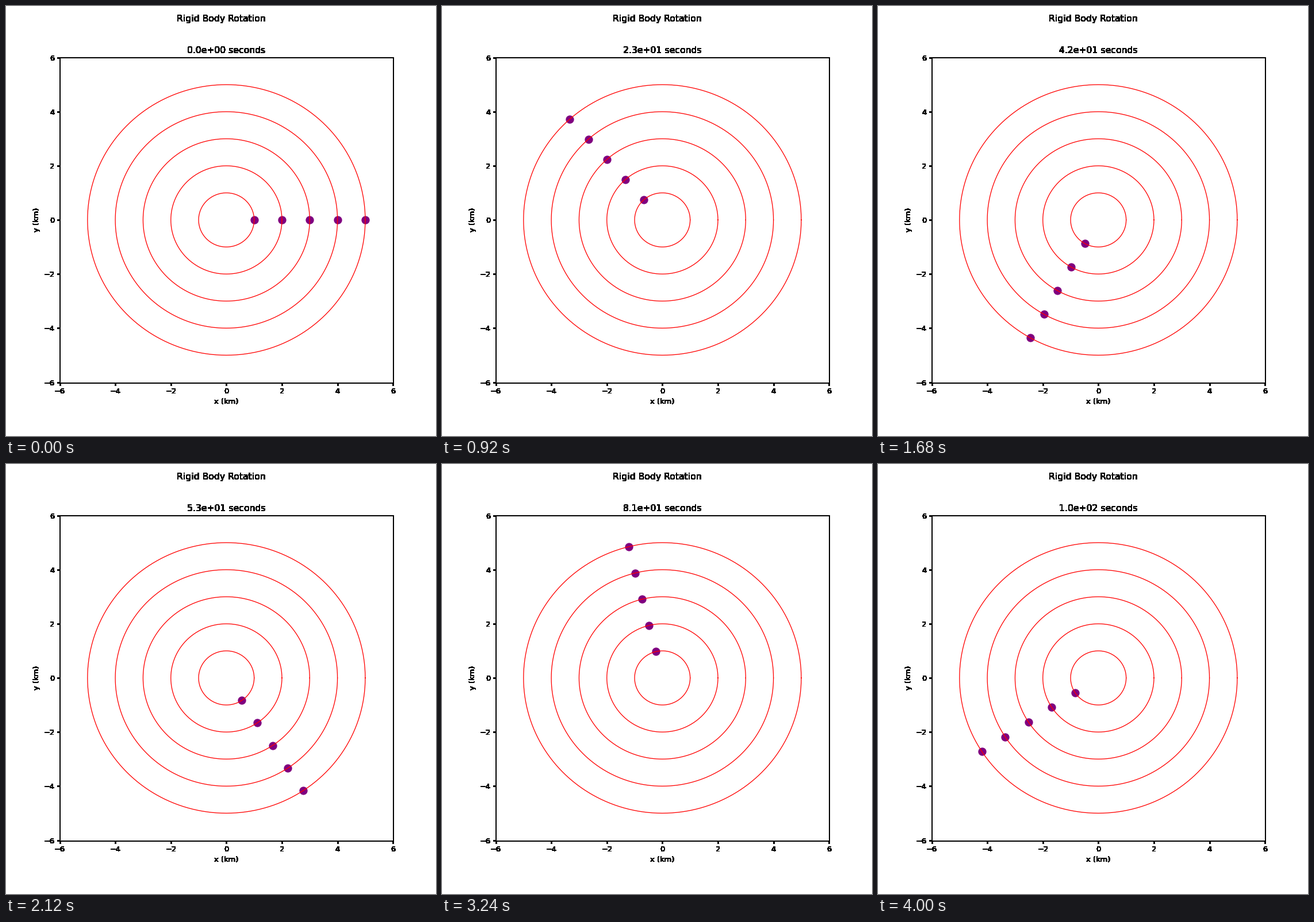
Recreate the animation shown at these times as a matplotlib script. Size 748x748 px, loop 4.04 s.

```python
import numpy as np
import matplotlib.pyplot as plt
from matplotlib.animation import FuncAnimation

FRAMES = 101
INTERVAL = 40
OMEGA = 0.1  # rad/s
RADII = np.arange(1, 6)
LIMITS = (-6, 6)

plt.rcParams["font.family"] = "DejaVu Sans"


def harden(img, dpi):
    """Turn every touched pixel fully opaque, without soft edges."""
    img[..., 3] = img[..., 3] > 0
    return img, 0, 0


fig = plt.figure(figsize=(8, 8), dpi=93.5, facecolor="white")
box = [0.125, 0.125, 0.775, 0.755]

# Hard-edged frame, ticks and labels, below the plot area
frame = fig.add_axes(box, xlim=LIMITS, ylim=LIMITS, label="frame")
frame.patch.set_visible(False)
frame.set_xlabel("x (km)")
frame.set_ylabel("y (km)")
title = frame.set_title("0.0e+00 seconds")
frame.set_agg_filter(harden)
fig.suptitle("Rigid Body Rotation").set_agg_filter(harden)

# Smooth plot area
ax = fig.add_axes(box, xlim=LIMITS, ylim=LIMITS, xticks=[], yticks=[],
                  label="orbits")
phi = np.linspace(0, 2 * np.pi, 361)
for r in RADII:
    ax.plot(r * np.cos(phi), r * np.sin(phi), color="red", lw=1)
dots = ax.scatter(RADII, 0 * RADII, s=100, color="purple", zorder=1)


def update(t):
    angle = OMEGA * t
    dots.set_offsets(np.outer(RADII, [np.cos(angle), np.sin(angle)]))
    title.set_text(f"{t:.1e} seconds")
    return dots, title


anim = FuncAnimation(fig, update, frames=FRAMES, interval=INTERVAL,
                     repeat=True, repeat_delay=0, blit=False)
plt.show()
```
